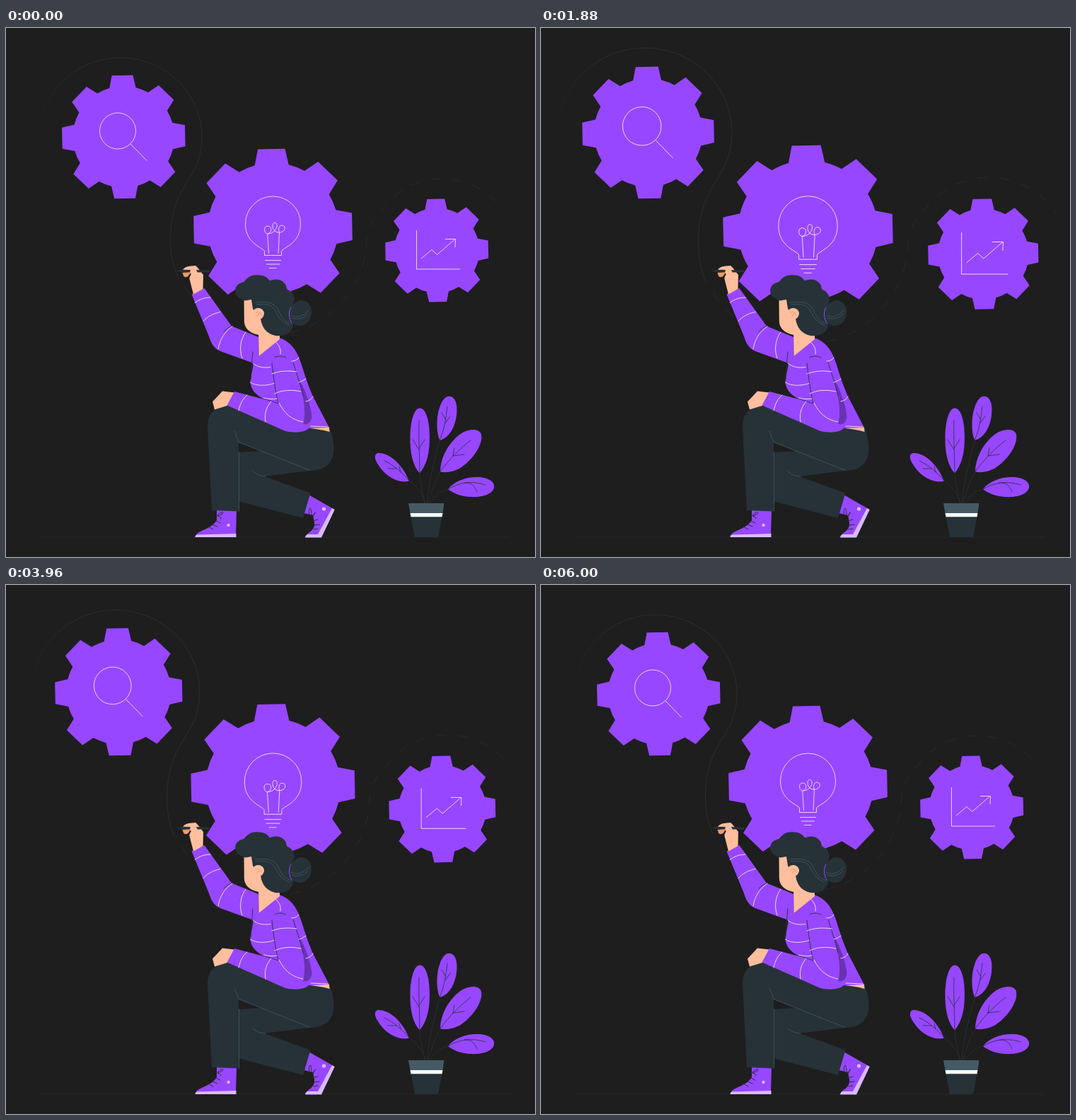
An HTML page with a canvas for the animation above (6040 ms loop, 748x748 px).

```html
<!DOCTYPE html>
<html lang="en">
<head>
<meta charset="utf-8">
<title>Turning ideas</title>
<style>
html, body { margin: 0; width: 100%; height: 100%; overflow: hidden; background: #1e1e1e; }
canvas { display: block; width: 748px; height: 748px; }
</style>
</head>
<body>
<canvas id="stage"></canvas>
<script>
const SIZE = 748, LOOP = 6040, STEP = 1000 / 24;
const BG = '#1e1e1e', PURPLE = '#9747ff', DARK = '#263238', SLATE = '#455a64';
const SKIN = '#ffbe9d', BLUSH = '#eb996e', LILAC = '#d9baff', SHADE = '#6a32b3', WHITE = '#fff';
const PIVOT = [377.5, 241];
// time in ms, scale
const PULSE = [[0, 1], [1140, 1.1], [3565, 1], [4755, 1.1], [5965, 1], [LOOP, 1]];

const canvas = document.getElementById('stage');
const ctx = canvas.getContext('2d');
const dpr = window.devicePixelRatio || 1;
canvas.width = canvas.height = SIZE * dpr;

function fill(c, d, color) {
  c.fillStyle = color;
  c.fill(new Path2D(d));
}

function line(c, d, color, width = 1) {
  c.strokeStyle = color;
  c.lineWidth = width;
  c.stroke(new Path2D(d));
}

function disc(c, x, y, r, color) {
  c.fillStyle = color;
  c.beginPath();
  c.arc(x, y, r, 0, Math.PI * 2);
  c.fill();
}

function pulse(t) {
  let i = 1;
  while (i < PULSE.length - 1 && t > PULSE[i][0]) i++;
  const [t0, a] = PULSE[i - 1], [t1, b] = PULSE[i];
  return a + (b - a) * (t - t0) / (t1 - t0);
}

function gear(x, y, r) {
  const base = 89.3, foot = 24, tip = 112, top = 19.2;
  const half = Math.atan2(foot, base);
  ctx.save();
  ctx.translate(x, y);
  ctx.scale(r / 112.3, r / 112.3);
  ctx.rotate(-0.02);
  ctx.beginPath();
  for (let i = 0; i < 8; i++) {
    const a = i * Math.PI / 4, co = Math.cos(a), si = Math.sin(a);
    const at = (u, v) => ctx.lineTo(u * co - v * si, u * si + v * co);
    at(base, -foot);
    at(tip, -top);
    at(tip, top);
    at(base, foot);
    ctx.arc(0, 0, Math.hypot(base, foot), a + half, a + Math.PI / 4 - half);
  }
  ctx.closePath();
  ctx.fillStyle = PURPLE;
  ctx.fill();
  ctx.restore();
}

function trail() {
  const fade = ctx.createLinearGradient(46, 0, 110, 0);
  fade.addColorStop(0, 'rgba(41,46,49,0.2)');
  fade.addColorStop(1, '#292e31');
  ctx.strokeStyle = fade;
  ctx.lineWidth = 0.9;
  ctx.beginPath();
  ctx.ellipse(162, 154, 115, 112, 0, Math.PI * 1.07, Math.PI * 2.11);
  ctx.bezierCurveTo(258, 221, 232, 240, 232.5, 300);
  ctx.bezierCurveTo(232.5, 318, 236, 338, 243, 352);
  ctx.stroke();

  ctx.strokeStyle = '#272c2e';
  ctx.setLineDash([14, 15]);
  ctx.beginPath();
  ctx.arc(372, 296, 138, 2.62, 0, true);
  ctx.bezierCurveTo(513, 280, 520, 269, 525, 263);
  ctx.arc(617, 319, 106, -2.6, -0.58);
  ctx.stroke();
  ctx.setLineDash([]);
}

function icons() {
  const l = d => line(ctx, d, WHITE, 0.75);
  // magnifier
  l('M132.5 145.5 A25.5 25.5 0 0 1 183.5 145.5 A25.5 25.5 0 0 1 132.5 145.5 M176 164 L199 187.5');
  // bulb
  l('M365.5 321.5 V316 C365.5 311 338.5 306 338.5 277 A39 39 0 0 1 416.5 277 C416.5 306 389.5 311 389.5 316 V321.5 Z');
  l('M366 328.5 H389 M368 334 H387 M372 339.5 H382.5');
  l('M371.5 319 L369.8 291.5 C364 289 364 280 370 280 C377 280 376 290 369.8 291 C378 291 384 284 383 278 C382 274 377 274 377 280 C377 288 385 291 391 288 C396 285 395 279 390 279 C385 279 385 286 386.5 290 L385 319');
  // chart
  l('M580.5 286 V341 H642 M587 326 L602 313.5 L609.5 320.5 L635 298.5 M621 298.5 H635.5 L635 310');
}

function paintPlant(c) {
  const leaves = [
    'M570 640.5 C555 645 535 633 526 617 C521 610 520 602 526 601 C539 600 559 613 570 640.5 Z',
    'M585 629.5 C575 619 571 600 571.5 577 C572 553 578 537.5 585 537.5 C593 537.5 599 553 599 578 C599 602 595 617 585 629.5 Z',
    'M613.5 583 C608.5 573 608 551 613 537 C617 524 623 520 628 521 C636 522 639 534 637 548 C634.5 567 625 580 613.5 583 Z',
    'M614 627.5 C614 609 625 586 644 573 C656 566 670 566 672 575 C675 589 659 612 641 623 C631 628 622 629 614 627.5 Z',
    'M625 652 C634 641 649 635 666 635 C682 635 692 642 690 650 C688 660 672 664 656 663 C643 662 632 658 625 652 Z'
  ];
  leaves.forEach(d => fill(c, d, PURPLE));
  line(c, 'M593 672 C590 658 580 648 570 640 M592 672 C589 655 585 642 585 629 M595 672 C598 640 606 610 613 583 M597 672 C601 655 607 640 614 627 M599 672 C606 661 615 654 625 652', '#2d3235', 0.8);
  const veins = [
    'M570 640 C560 628 548 618 535 612 M552 623 L540 623 M558 628 L556 620',
    'M585 629 C585 605 583 580 584 555 M584.5 597 L575 582 M584.5 594 L592 582',
    'M613 583 C620 568 622 552 624 535 M621 559 L628 549 M622 554 L616 544',
    'M614 627 C625 612 640 596 657 583 M632 605 L634 594 M632 605 L648 603',
    'M625 652 C638 645 648 642 656 644 C661 646 664 651 666 656 M648 643 C658 642 668 643 678 646'
  ];
  veins.forEach(d => line(c, d, DARK, 0.8));
  fill(c, 'M569 672 H619.5 L617.5 686 H571.5 Z', SLATE);
  fill(c, 'M571.5 686 H617.5 L616.5 691.5 H572.5 Z', WHITE);
  fill(c, 'M572.5 691.5 H616.5 L611 720 H578 Z', DARK);
}

function paintLegs(c) {
  // back shoe
  fill(c, 'M428 660 L463 680 L444 718 H424 C428 712 437 711 436 699 L434 689 L421 686 Z', PURPLE);
  fill(c, 'M461 679 L464.8 681 L446 720.5 H423 C423 718 425 716 428 716 H441 Z', LILAC);
  disc(c, 449.5, 680, 2.6, LILAC);
  line(c, 'M429 689 C427 681 430 677 431 680 C432 685 431 688 434 690 C439 681 438 685 434 691 M434 697 L441 695 M436 703 L443 702 M435 709 L441 708', DARK, 1);
  // front shoe
  fill(c, 'M298 682 H326 L325 717 H269 C272 710 290 709 298 696 Z', PURPLE);
  fill(c, 'M270 716.5 L325.5 715 V720 H267.5 C267.5 718 268 717 270 716.5 Z', LILAC);
  disc(c, 314.5, 703, 2.2, LILAC);
  line(c, 'M299 689 C304 683 309 684 306 687 L299 690 C303 691 306 693 303 694 M297 697 L303 700 M292 702 L299 705 M286 705 L293 709', DARK, 1);
  // trousers
  fill(c, 'M329 599 L366 597 L430 626 L365 634 L430.5 657.5 L420 693 L328 669 Z', DARK);
  fill(c, 'M313 533 C293 537 285 546 285 565 L291 682 L329 683.5 V586 L430 626 C455 626 464 611 463.5 593 C463 582 461 574 458 568 L420 562 L345 535 Z', DARK);
  fill(c, 'M329.5 586.5 L361 598 L329.5 600 Z', BG);
  line(c, 'M323 570 L329 585.5 L430 625.5 M329.5 600 V683', SLATE, 0.8);
  line(c, 'M349 627 C355 632 361 634 367 634', SLATE, 0.8);
}

function paintHand(c) {
  fill(c, 'M250 341.5 C252 339 256 337 260 336.8 L268 336 C271 338 274 343 279 349 L278.5 369 L265 376.5 L259.5 355 C259 351 262 350 262 346 Z', SKIN);
  fill(c, 'M249.5 346 L262 344.5 L257.5 351 C255 353 252 352.5 251 350.5 Z', BLUSH);
  fill(c, 'M241 343.5 L249 341.8 L286 342.4 C288 343 288 345 286 345.6 L249 345.5 Z', DARK);
  fill(c, 'M261 341 C267 339 271 343 271 348 C270 354 265 354 264 350 L260 346 Z', SKIN);
}

function paintTorso(c) {
  fill(c, 'M432 563 L457 564 L457.5 571 C447 568 438 567 430 566 Z', SKIN);
  // resting hand
  fill(c, 'M323 515.5 L306 513.5 L292 528.5 L295 539.5 L313 534 Z', SKIN);
  // sweater
  fill(c, 'M262.5 376.5 L280.5 368 L319 421.5 L357 437 L357.5 464 L386.5 438 C402 443 410 455 415 468 C419 478 422 490 426 501 L433 519 L457 565 L428 566 C422 572 409 573 395 570 L312.5 533.5 L323 514 L365 525 C353 519 345 510 345.5 499 L350 474 L303 457 C294 453 290 446 287 436 Z', PURPLE);
  fill(c, 'M414 496 C423 511 431 533 432.5 549 C432 557 427 562 420 560 C425 545 421 522 414 496 Z', SHADE);
  line(c, 'M349 458 C348 470 346 486 346 497 M308 429 C312 425 315 423 319 422 M376 474 C378 492 381 515 385 531 L363 523.5 M380 465.5 C387 463 391 464 396 466 M406 473 C411 488 416 504 420 520', DARK, 0.9);
  const stripes = [
    'M267 388.5 C273 384 280 381 289 381',
    'M279 414.5 C285 408 292 404 303 401.5',
    'M300 454 C302 441 309 429 320 422',
    'M334 467 C329 454 332 439 339 430',
    'M349 474 C356 480 365 481 374 479.5',
    'M345.5 501 C354 507 369 506 379 502.5',
    'M364 523 C371 525 377 525 383 524',
    'M381 444 C387 449 389 455 388 461',
    'M376 489 C386 485 398 484 411 486',
    'M380 517 C390 512 403 511 417 514',
    'M404 471 C409 471 412 469 414 466',
    'M414 501 C418 500 421 498 424 496',
    'M329 541 C331 531 335 524 341 519',
    'M367 557 C365 545 368 536 375 528',
    'M386 530 C394 546 404 554 420 557',
    'M424 528 C429 527 432 525 434 521',
    'M431 563 L455 564'
  ];
  stripes.forEach(d => line(c, d, WHITE, 0.8));
}

function paintHead(c) {
  fill(c, 'M357 428 H387 V440 L357.5 464 Z', SKIN);
  fill(c, 'M336.5 383 H372 V434 H357 C344 431 337 425 336.8 414 Z', SKIN);
  fill(c, 'M338 385.5 C327 383 322 374 325 367 C328 360 335 360 337 358.5 C342 351 350 348 358 349.5 C366 350 370 353 373 357.5 C382 353 392 356 396 364 C396 367 397 369 398 370 C407 373 410 384 406 390 C410 402 409 417 403 428 C398 434 389 436 381 435 C368 432 362 424 360 411 L349 397 L347 384 Z', DARK);
  fill(c, 'M416 385 C425 384 432 391 432 401 C432 412 425 421 416 421 C406 421 401 414 401 406 C401 396 407 387 416 385 Z', DARK);
  line(c, 'M403 395 C399 401 400 411 404 417', PURPLE, 1);
  fill(c, 'M351 398 C355 394 364 396 365 403 C365 410 358 415 352 411 C349 409 349 401 351 398 Z', SKIN);
  line(c, 'M353 403 C357 400 361 402 361 406 M355 408 C355 405 357 404 360 404', BLUSH, 0.8);
  line(c, 'M352 388 C367 386 379 388 384 397 C389 409 395 416 404 418 M354 391 C368 389 377 392 381 400 C386 411 393 418 401 420', SLATE, 0.8);
  line(c, 'M403 406 C412 411 421 407 428 399 M404 410 C414 413 422 410 427 404', SLATE, 0.8);
}

// the still parts are painted once
const still = document.createElement('canvas');
still.width = still.height = SIZE * dpr;
const sc = still.getContext('2d');
sc.scale(dpr, dpr);
sc.lineCap = sc.lineJoin = 'round';
[paintPlant, paintLegs, paintTorso, paintHand, paintHead].forEach(paint => paint(sc));

function draw(t) {
  const s = pulse(t);
  ctx.setTransform(dpr, 0, 0, dpr, 0, 0);
  ctx.fillStyle = BG;
  ctx.fillRect(0, 0, SIZE, SIZE);
  line(ctx, 'M48 720 H712', '#23282a', 1);
  ctx.translate(PIVOT[0], PIVOT[1]);
  ctx.scale(s, s);
  ctx.translate(-PIVOT[0], -PIVOT[1]);
  trail();
  gear(166.3, 154, 87.2);
  gear(377.5, 283, 112.3);
  gear(609.2, 314.5, 73);
  icons();
  ctx.setTransform(1, 0, 0, 1, 0, 0);
  ctx.drawImage(still, 0, 0);
}

const start = performance.now();
function tick(now) {
  const t = Math.max(0, now - start) % LOOP;
  draw(Math.floor((t + 5) / STEP) * STEP);
  requestAnimationFrame(tick);
}
draw(0);
requestAnimationFrame(tick);
</script>
</body>
</html>
```
